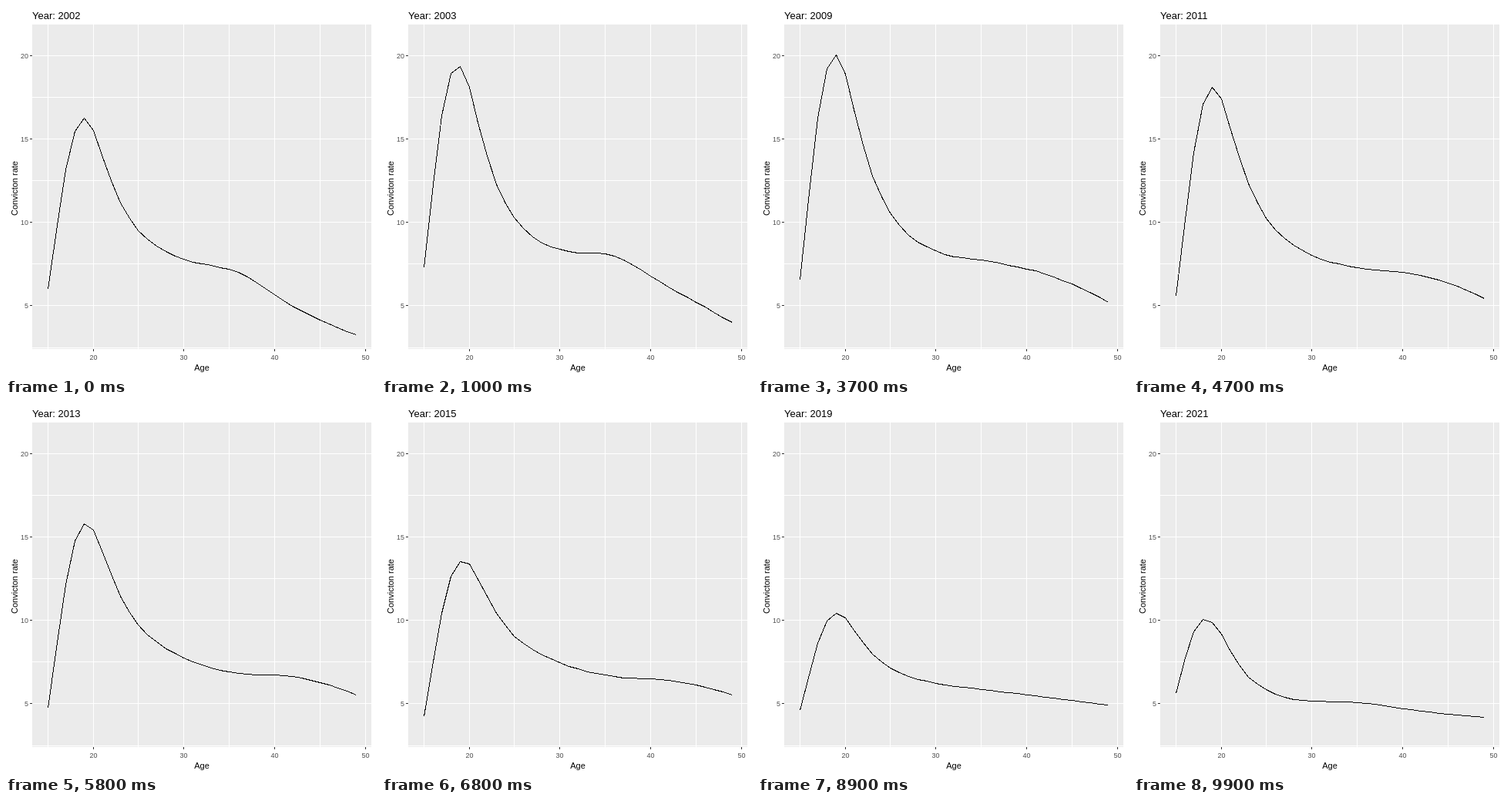
An HTML page that plays this animation: 480 by 480 pixels, repeating every 10 s.

```html
<!DOCTYPE html>
<html lang="en">
<head>
<meta charset="utf-8">
<title>Conviction rate by age</title>
<style>
  html, body { margin: 0; width: 100%; height: 100%; overflow: hidden; background: #fff; }
  svg { display: block; width: 480px; height: 480px; font-family: "Liberation Sans", Arial, sans-serif; font-size: 11px; }
  .tick { font-size: 9px; fill: #4d4d4d; }
  #title { font-size: 13px; }
  #curve { fill: none; stroke: #000; stroke-width: 1; }
  rect, #curve { shape-rendering: crispEdges; }
</style>
</head>
<body>
<svg id="chart" viewBox="0 0 480 480">
  <rect x="34" y="24" width="440" height="421" fill="#ebebeb"/>
  <g id="axes"></g>
  <polyline id="curve"/>
  <text id="title" x="34" y="17"></text>
  <text x="254" y="473" text-anchor="middle">Age</text>
  <text transform="translate(15 236.5) rotate(-90)" text-anchor="middle">Convicton rate</text>
</svg>
<script>
const FIRST_YEAR = 2002, YEAR_STEPS = 19, FRAMES = 100, FRAME_MS = 100;
const FIRST_AGE = 15, LAST_AGE = 49;

// A few features describe each curve: rates at key ages, and how early the peak comes.
const keyYears = [2002, 2004, 2007, 2009, 2013, 2017, 2021];
const features = {
  start:  [5.99, 7.29, 7.34, 6.55, 4.74, 4.12, 5.62],
  peak:   [16.25, 19.37, 20.94, 20.07, 15.81, 11.63, 9.9],
  lead:   [0.085, 0.115, 0.115, 0.097, 0.045, 0.03, 0.15],
  thirty: [7.8, 8.38, 8.52, 8.29, 7.75, 7.01, 5.18],
  bend:   [6.99, 7.98, 8.1, 7.66, 6.83, 6.36, 5.04],
  late:   [4.98, 6.13, 6.83, 6.92, 6.64, 6.04, 4.56],
  end:    [3.26, 4, 4.83, 5.21, 5.53, 5.37, 4.19]
};

// Cubic Hermite interpolation with parabolic tangents.
function interpolate(xs, ys, x) {
  const last = xs.length - 1;
  const slope = i => (ys[i + 1] - ys[i]) / (xs[i + 1] - xs[i]);
  const tangent = i => {
    if (i === 0) return 2 * slope(0) - tangent(1);
    if (i === last) return 2 * slope(last - 1) - tangent(last - 1);
    const before = xs[i] - xs[i - 1], after = xs[i + 1] - xs[i];
    return (slope(i - 1) * after + slope(i) * before) / (before + after);
  };
  let i = 0;
  while (i < last - 1 && x >= xs[i + 1]) i++;
  const h = xs[i + 1] - xs[i], t = (x - xs[i]) / h, u = 1 - t;
  return u * u * (1 + 2 * t) * ys[i] + t * t * (3 - 2 * t) * ys[i + 1]
    + h * t * u * (u * tangent(i) - t * tangent(i + 1));
}

const ageX = age => Math.round(33.8 + (age - 13.3) * 440 / 37.4);
const rateY = rate => Math.round(496.51 - 21.604 * rate);

// The earlier the peak, the steeper both of its flanks.
function rateCurve(year) {
  const at = name => interpolate(keyYears, features[name], year);
  const start = at("start"), peak = at("peak"), thirty = at("thirty"), lead = at("lead");
  const steepness = 0.665 + 60 * lead ** 3;
  const rise = share => start + (peak - start) * share;
  const fall = share => peak + (thirty - peak) * share;
  const rates = {
    15: start,
    16: rise(0.595 * steepness ** 1.3),
    17: rise(steepness),
    18: rise(0.45 + 0.68 * steepness),
    19: peak,
    20: fall(lead),
    21: fall(0.135 + 1.5 * lead),
    23: fall(0.47 + 1.5 * lead),
    25: fall(0.71 + lead),
    27: fall(0.85 + 0.7 * lead),
    30: thirty,
    36: at("bend"),
    42: at("late"),
    49: at("end")
  };
  const ages = Object.keys(rates).map(Number), values = Object.values(rates);
  return age => interpolate(ages, values, age);
}

function curvePoints(year) {
  const rate = rateCurve(year), points = [];
  for (let age = FIRST_AGE; age <= LAST_AGE; age++) {
    points.push(`${ageX(age) + 0.5},${rateY(rate(age)) + 0.5}`);
  }
  return points.join(" ");
}

const rect = (x, y, w, h, fill) => `<rect x="${x}" y="${y}" width="${w}" height="${h}" fill="${fill}"/>`;
const label = (x, y, anchor, text) => `<text class="tick" x="${x}" y="${y}" text-anchor="${anchor}">${text}</text>`;

function drawAxes() {
  let out = "";
  for (let rate = 2.5; rate <= 20; rate += 2.5) {
    const y = rateY(rate);
    out += rect(34, y, 440, 1, "#fff");
    if (rate % 5 === 0) out += rect(31, y, 3, 1, "#333") + label(29, y + 4, "end", rate);
  }
  for (let age = 15; age <= 50; age += 5) {
    const x = ageX(age);
    out += rect(x, 24, 1, 421, "#fff");
    if (age % 10 === 0) out += rect(x, 445, 1, 3, "#333") + label(x + 0.5, 459, "middle", age);
  }
  document.getElementById("axes").innerHTML = out;
}

const lines = Array.from({ length: YEAR_STEPS + 1 }, (_, i) => curvePoints(FIRST_YEAR + i));
const curve = document.getElementById("curve"), title = document.getElementById("title");

// The curve switches on the nearest frame, the title only once the year is reached.
function draw(now) {
  const frame = Math.floor(now / FRAME_MS) % FRAMES;
  const lineIndex = Math.floor((frame + 0.5) * YEAR_STEPS / (FRAMES - 1));
  const titleYear = FIRST_YEAR + Math.floor(frame * YEAR_STEPS / (FRAMES - 1));
  curve.setAttribute("points", lines[lineIndex]);
  title.textContent = `Year: ${titleYear}`;
}

drawAxes();
draw(0);
const start = performance.now();
requestAnimationFrame(function tick() {
  draw(performance.now() - start);
  requestAnimationFrame(tick);
});
</script>
</body>
</html>
```
